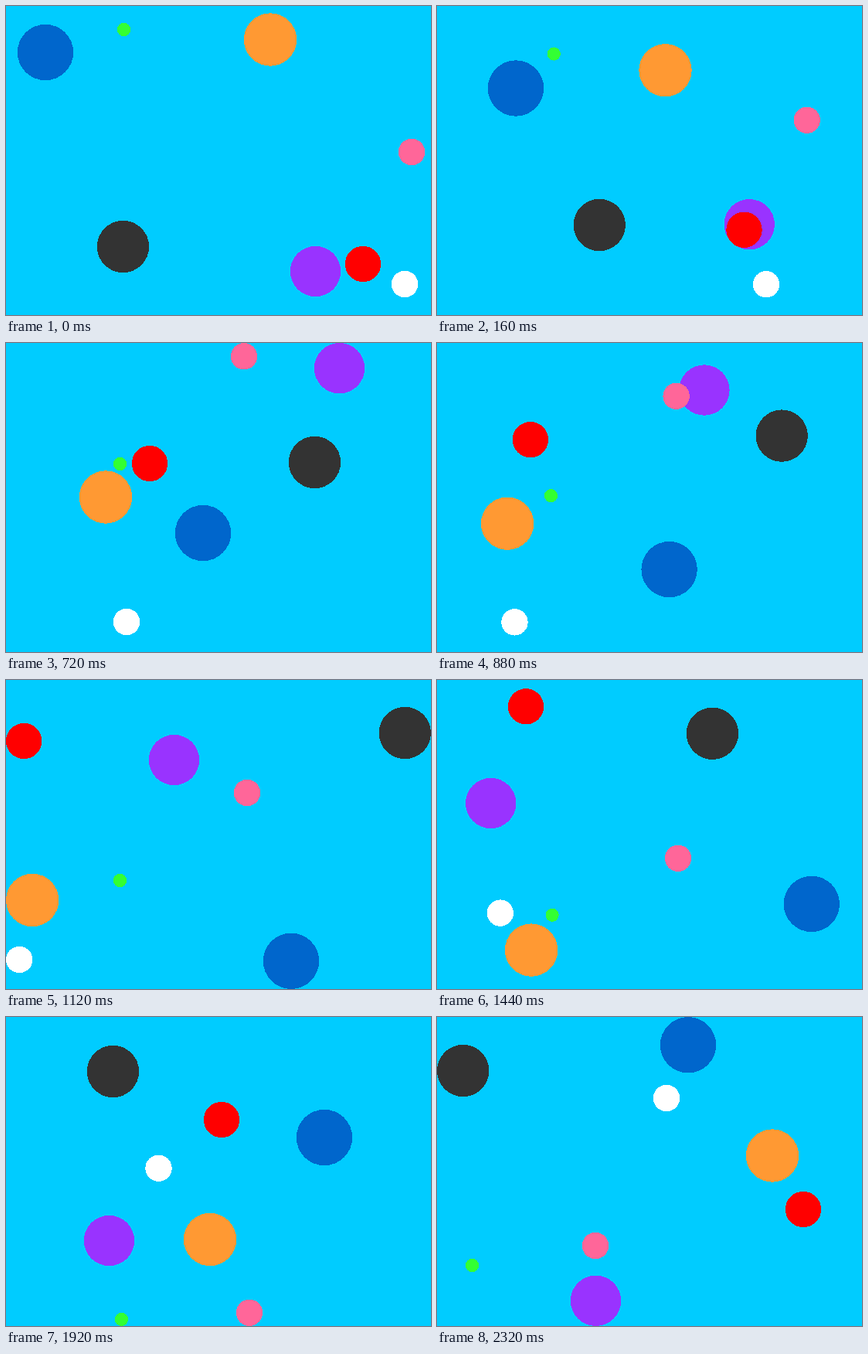
An HTML page for the animation above (2400 ms loop, 550 by 400 pixels).

```html
<!DOCTYPE html>
<html lang="en">
<head>
<meta charset="utf-8">
<title>Bouncing balls</title>
<style>
  html, body { margin: 0; width: 100%; height: 100%; overflow: hidden; background: #0cf; }
  svg { display: block; width: 550px; height: 400px; background: #0cf; shape-rendering: crispEdges; }
</style>
</head>
<body>
<svg id="stage" viewBox="0 0 550 400"></svg>
<script>
const W = 550, H = 400, STEP = 80, COUNT = 30, LEG = 5;
const stage = document.getElementById('stage');
const balls = [];

const mix = (a, b, u) => a + (b - a) * u;
const mid = (a, b) => [mix(a[0], b[0], .5), mix(a[1], b[1], .5)];
const clamp = (v, r, size) => Math.min(Math.max(v, r), size - r);

// Turning points, one per leg. A gap is the midpoint of its neighbours,
// and a point on an edge of the stage rests the ball against that edge.
function ball(fill, r, ...stops) {
  const el = document.createElementNS('http://www.w3.org/2000/svg', 'circle');
  el.setAttribute('fill', fill);
  el.setAttribute('r', r);
  stage.append(el);
  const path = stops
    .map(p => p && [clamp(p[0], r, W), clamp(p[1], r, H)])
    .map((p, i, all) => p || mid(all[i - 1], all[i + 1]));
  balls.push({ el, path });
}

const gap = null;
ball('#333', 33.7, [151.5, 311.5], [269, 255.5], [399.5, 154.5], [W, 68.5], [316.5, 69.5], [138.5, 70.5], [0, 69.5]);
ball('#06c', 36.2, [51, 60], gap, [255, 246], [369, H], [W, 271.5], [412, 156], [325, 0]);
ball('#93f', 32.7, [400.5, 343.5], [408, 222], [431.5, 0], [217.5, 103.5], [0, 173.5], [133.5, 289.5], [205.5, H]);
ball('#f93', 34.2, [342, 43.5], [249, 123], [129, 199.5], [0, 285], [144, H], [264, 288], [434, 179.5]);
ball('red', 23.2, [462, 334], [333, 245.5], [186, 156], [0, 79], [138, 0], [279, 133], [474, 249]);
ball('#f69', 17.2, [525, 189], [432.5, 106.5], [308, 0], [312, 146], [312, 252], [315, H], [205, 296]);
ball('#fff', 17.2, [516, 360], gap, [156, 361], [0, 362], [98, 286.5], gap, [297, 105]);
ball('#3f3', 8.6, [152.5, 30.5], gap, [147.5, 156.5], [147.5, 259.5], [149.5, 315.5], [149.5, H], [45.5, 321.5]);

// The first leg is one step shorter than the others.
function draw(n) {
  const phase = n < LEG - 1 ? n / (LEG - 1) : (n + 1) / LEG;
  const k = Math.min(Math.floor(phase), COUNT / LEG - 1);
  for (const { el, path } of balls) {
    const [a, b] = path.slice(k, k + 2);
    el.setAttribute('cx', mix(a[0], b[0], phase - k));
    el.setAttribute('cy', mix(a[1], b[1], phase - k));
  }
}

const start = performance.now();
function tick() {
  draw(Math.floor((performance.now() - start) / STEP) % COUNT);
  requestAnimationFrame(tick);
}
tick();
</script>
</body>
</html>
```
